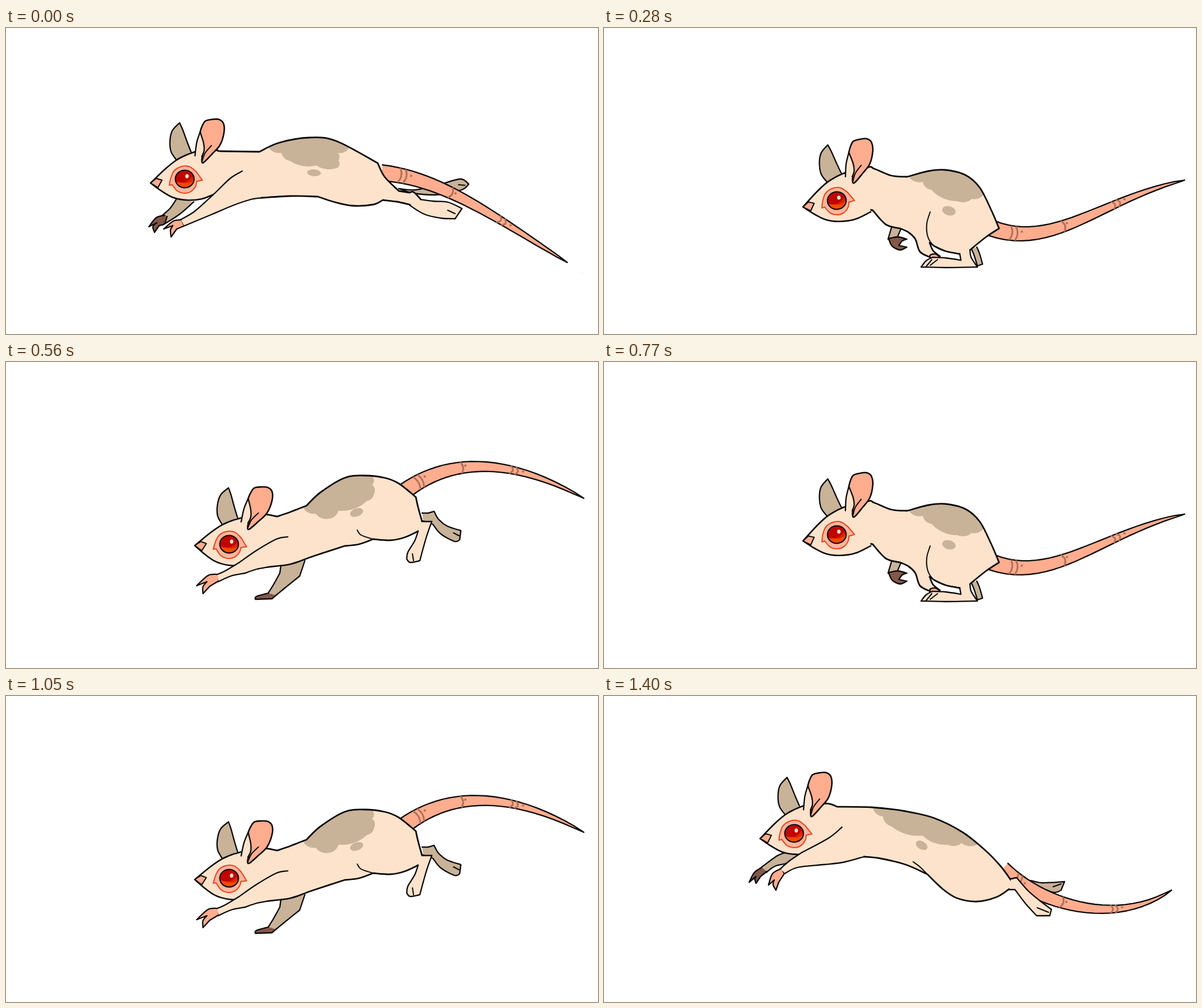
An HTML page for the animation above (1470 ms loop, 1040 px wide and 539 px high).

```html
<!DOCTYPE html>
<html lang="en">
<head>
<meta charset="utf-8">
<title>Running mouse</title>
<style>
  html, body { margin: 0; width: 100%; height: 100%; overflow: hidden; background: #fff; }
  svg { display: block; width: 100%; height: 100%; }
  path { stroke-linejoin: round; stroke-linecap: round; }
</style>
</head>
<body>
<svg id="stage" viewBox="0 0 1040 539"></svg>
<script>
const STEP = 70;
const INK = '#0a0808', SKIN = '#fde3cb', TAN = '#c8b298', PINK = '#ffad8e', DARK = '#835848', BAND = '#b0705a';

// Points are "x y x y"; a slash makes a corner at the point before it.
function pairs(text) {
  const n = text.trim().split(/\s+/).map(Number), out = [];
  for (let i = 0; i < n.length; i += 2) out.push([n[i], n[i + 1]]);
  return out;
}

function curve(text) {
  let d = '', last;
  for (const part of text.split('/')) {
    const p = pairs(part);
    if (last) p.unshift(last); else d = 'M' + p[0];
    for (let i = 0; i < p.length - 1; i++) {
      const b = p[i], c = p[i + 1], a = p[i - 1] || b, e = p[i + 2] || c;
      const h1 = b.map((v, k) => (v + (c[k] - a[k]) / 6).toFixed(1));
      const h2 = c.map((v, k) => (v - (e[k] - b[k]) / 6).toFixed(1));
      d += `C${h1} ${h2} ${c}`;
    }
    last = p[p.length - 1];
  }
  return d;
}

const path = (d, fill = 'none', stroke = 'none', width = 2.3, extra = '') =>
  `<path d="${d}" fill="${fill}" stroke="${stroke}" stroke-width="${width}" ${extra}/>`;
const shape = (text, fill, width) => path(curve(text), fill, INK, width);
const line = text => shape(text, 'none', 2);

// Tapered tube along one cubic, with bands and dots.
function tail(text) {
  const [a, b, c, e] = pairs(text);
  const at = (s, side) => {
    const u = 1 - s;
    const pos = k => u * u * u * a[k] + 3 * u * u * s * b[k] + 3 * u * s * s * c[k] + s * s * s * e[k];
    const vel = k => u * u * (b[k] - a[k]) + 2 * u * s * (c[k] - b[k]) + s * s * (e[k] - c[k]);
    const w = side * 14 * Math.pow(u, .66) / Math.hypot(vel(0), vel(1));
    return [pos(0) + vel(1) * w, pos(1) - vel(0) * w].map(v => v.toFixed(1));
  };
  const top = [], low = [];
  for (let i = 0; i <= 24; i++) {
    top.push(at(i / 24, 1));
    low.unshift(at(i / 24, -1));
  }
  const bands = [.1, .13, .4, .67, .695].map(s =>
    path(`M${at(s, .9)}Q${at(s + .022, 0)} ${at(s, -.9)}`, 'none', BAND, 3));
  const dots = [.165, .425, .73].map(s => {
    const [x, y] = at(s, .3);
    return `<circle cx="${x}" cy="${y}" r="2" fill="${BAND}"/>`;
  });
  return path('M' + top.concat(low).join('L'), PINK, INK, 2.3) + bands.join('') + dots.join('');
}

// Fur patch: scalloped lower edge, open upward and clipped by the body.
function patch(text) {
  const p = pairs(text), end = p[p.length - 1];
  let d = 'M' + p[0];
  for (let i = 1; i < p.length; i++) {
    const len = Math.hypot(p[i][0] - p[i - 1][0], p[i][1] - p[i - 1][1]);
    const r = (len * .6 + len * len / 80).toFixed(1);
    d += `A${r} ${r} 0 0 0 ${p[i]}`;
  }
  return path(d + `L${end[0]} ${end[1] - 70}L${p[0][0]} ${p[0][1] - 70}Z`, TAN);
}

const FACE = '18 -48 2 -42 -15 -33 -35 -17 -60 7 / -44 19 -22 32 2 37 30 35 58 24';
const farEar = shape('-15 -34 -24 -48 -26 -66 -22 -85 -9 -99 / -4 -88 4 -66 11 -48', TAN);
const head =
  path(curve(FACE) + 'L52 -46Z', SKIN) + shape(FACE, 'none', 2.6) +
  shape('-60 7 / -50 -1 / -40 2 / -47 15 / -60 7', PINK, 2) +
  shape('27 -83 30 -92 36 -102 48 -105 60 -105 68 -98 69 -82 62 -60 48 -44 33 -29 30 -34 33 -50 / 27 -83', PINK, 2.6) +
  shape('18 -41 21 -64 27 -83 / 33 -64 34 -50 30 -40', SKIN) +
  line('47 -59 36 -46 31 -33') +
  path(curve('-22 10 / -27 11 / -25 0 -19 -14 -6 -22 8 -22 20 -13 / 31 2 / 21 4 / 19 13 11 22 0 25 -13 21 -22 10'), '#fcb79e', '#f0401a', 2) +
  `<ellipse rx="16.5" ry="15.5" fill="#c00400"/>` +
  path('M-15.500 5Q2 9 16 1A16.500 15.500 0 0 1 -15.500 5Z', '#ee4a00') +
  path('M-9 6Q4 8 13 -4Q16 2 12 5Q2 9 -9 6Z', '#dc2400') +
  `<ellipse rx="16.5" ry="15.5" fill="none" stroke="${INK}" stroke-width="2"/>` +
  `<ellipse cx="4" cy="-5" rx="3" ry="3.600" fill="#ffe6cf"/>`;

const poses = [
  {
    head: [314, 266, 0],
    tail: '660 255 765 265 850 327 986 413',
    far: [
      ['299 302 288 318 272 332 / 277 346 / 305 328 330 306', TAN],
      ['279 330 264 334 251 350 / 265 343 / 258 350 261 360 / 269 348 / 278 345 283 332', DARK],
      ['690 283 716 291 750 294 775 292 / 803 284 813 275 / 799 266 768 274 / 720 285 690 283', TAN]
    ],
    farLines: ['795 276 806 277'],
    body: '325 235 / 368 216 378 217 445 218 / 480 202 533 193 580 199 653 238 / 665 262 690 287 / 709 290 / 716 289 728 301 / 735 318 / 709 311 / 687 306 662 303 / 645 311 608 313 575 306 548 297 / 500 296 450 299 / 325 290 / 325 235',
    patch: '461 210 484 220 499 234 545 242 583 246 584 233 583 220 602 212',
    spot: [541, 255, 12, 6, 3],
    near: [
      ['415 252 395 264 375 283 / 355 302 330 324 306 338 / 312 349 / 360 329 400 312 430 302 450 299', SKIN],
      ['307 338 294 340 277 354 / 293 348 / 289 356 290 368 / 300 354 / 312 349', PINK],
      ['728 302 750 305 777 307 801 318 / 789 336 / 765 335 735 328 709 312', SKIN]
    ],
    lines: ['776 321 789 327'],
    extra: path('M1011 431L1013 433', 'none', '#ddd', 1)
  },
  {
    head: [392, 321, 4.5],
    tail: '700 228 770 175 872 160 1015 240',
    far: [
      ['483 358 481 372 / 470 392 460 408 / 467 417 / 490 398 516 377 / 525 350', TAN],
      ['461 407 440 413 438 418 / 467 417 / 474 411', DARK],
      ['731 266 742 266 752 263 / 760 277 775 289 799 297 / 797 313 / 788 316 764 303 750 286 / 733 280', TAN]
    ],
    farLines: ['786 301 796 306'],
    body: '395 300 / 440 270 477 272 / 500 264 528 253 / 552 230 595 204 630 200 665 204 690 214 720 238 / 724 256 731 281 / 738 290 / 724 298 / 700 309 675 314 645 312 / 620 321 595 324 / 540 342 500 356 460 361 / 405 345 / 395 335 / 395 300',
    patch: '523 258 544 267 567 276 584 262 634 245 647 231 643 216 645 204',
    spot: [616, 265, 12, 7, -20],
    near: [
      ['495 308 475 312 440 332 410 353 / 385 368 369 375 / 373 387 / 395 377 420 372 / 440 365 461 361', SKIN],
      ['371 374 355 376 335 394 / 353 387 / 346 396 346 408 / 358 395 / 373 386', PINK],
      ['731 281 748 281 / 738 310 727 350 / 710 353 704 347 / 706 335 718 315 724 298', SKIN]
    ],
    lines: ['617 296 624 305 645 312', '714 338 716 350']
  },
  {
    head: [428, 332, 4],
    tail: '705 270 765 215 845 174 985 202',
    far: [
      ['545 375 560 382 585 393 600 402 / 602 408 616 407 / 612 398 597 378 582 354', TAN],
      ['600 403 598 408 583 414 584 420 / 606 420 / 617 408 / 613 404', DARK],
      ['703 352 670 362 650 376 642 390 / 650 394 / 660 388 690 362 705 358', TAN],
      ['707 322 714 332 725 350 / 718 355 708 343', TAN]
    ],
    farLines: ['654 390 662 378'],
    body: '430 300 / 485 284 507 285 / 540 255 590 228 628 223 665 231 700 254 713 266 / 707 300 706 340 / 708 350 / 700 352 / 680 355 650 355 622 344 / 613 342 595 345 / 580 352 / 530 370 / 502 357 / 486 357 / 430 300',
    patch: '541 262 553 272 566 281 580 283 597 283 641 278 648 266 650 252 661 236',
    spot: [621, 295, 13, 7, -8],
    near: [
      ['502 358 497 374 / 485 386 467 396 / 472 406 / 490 406 510 403 545 378 580 352', SKIN],
      ['474 394 455 396 436 400 / 451 404 / 442 408 438 415 / 455 410 475 405', PINK],
      ['706 325 707 342 722 358 / 702 375 690 394 / 672 400 654 404 / 658 390 672 381 692 372 / 698 364 702 352', SKIN]
    ],
    lines: ['600 305 604 322 622 344 655 355 700 351', '664 399 674 386', '673 398 679 384']
  },
  {
    head: [426, 318, 0],
    tail: '698 318 778 303 861 237 1002 235',
    far: [
      ['548 366 552 385 566 402 / 580 400 / 575 380 580 355', TAN],
      ['566 400 560 410 549 418 552 423 / 575 422 / 581 400', DARK],
      ['655 375 630 384 600 394 586 404 / 590 412 / 615 408 650 392', TAN]
    ],
    body: '420 290 / 480 268 515 274 / 550 247 605 234 650 244 688 276 706 312 / 702 330 698 345 / 680 370 / 662 372 / 630 373 605 366 590 350 / 575 355 / 530 362 / 502 342 / 484 341 / 420 290',
    patch: '533 268 555 274 568 287 590 290 640 287 655 272 657 258 668 255',
    spot: [616, 306, 13, 7, 3],
    near: [
      ['502 342 506 365 500 390 495 408 / 508 412 / 522 395 545 372 575 355', SKIN],
      ['496 406 484 412 472 419 474 424 / 502 424 / 509 410', PINK],
      ['700 338 696 352 683 370 / 668 386 655 402 / 630 414 608 418 / 604 414 / 612 402 635 392 / 652 384 662 370', SKIN]
    ],
    lines: ['589 312 583 335 596 358 630 373 662 372', '613 415 622 404']
  },
  {
    head: [409, 304, -4],
    tail: '682 353 790 392 877 300 1020 268',
    far: [
      ['506 348 499 372 / 512 373 522 353', TAN],
      ['500 371 506 384 520 391 532 386 / 518 383 / 524 375 532 372 / 516 368 500 371', DARK],
      ['655 386 660 398 665 416 / 656 419 / 650 400 645 388', TAN]
    ],
    body: '400 270 / 461 246 475 248 505 260 533 262 / 570 252 600 250 635 259 660 281 680 320 694 353 / 670 369 643 391 / 640 402 / 625 398 / 600 393 580 384 / 572 378 / 578 392 590 402 / 580 406 573 404 / 555 394 547 372 535 360 520 353 / 495 346 472 321 / 455 318 / 400 270',
    patch: '536 263 560 271 575 285 621 305 646 301 667 293',
    spot: [606, 322, 12, 8, 15],
    near: [
      ['573 404 573 400 582 398 590 403', PINK],
      ['625 398 / 627 409 / 600 405 577 404 / 566 410 557 421 / 600 422 656 421 / 645 404 643 391', SKIN]
    ],
    lines: ['573 324 567 345 569 368 580 384 600 393 625 398', '566 420 576 408', '573 418 586 408']
  },
  {
    head: [373, 266, -3],
    tail: '691 330 778 378 886 354 1008 305',
    far: [
      ['395 298 375 310 352 325 / 360 334 / 385 325 410 308', TAN],
      ['353 324 340 332 333 346 / 344 340 / 343 348 346 354 / 352 342 / 361 333', DARK],
      ['708 360 735 390 752 410 / 748 421 / 730 420 / 715 395', TAN]
    ],
    body: '380 240 / 425 214 450 219 500 223 / 550 221 600 232 645 258 675 294 704 338 / 702 350 / 695 380 / 668 372 / 625 366 590 350 568 328 / 530 314 490 308 462 308 / 400 292 / 380 285 / 380 240',
    patch: '503 224 525 237 540 250 590 270 628 281 648 275 668 284',
    spot: [582, 292, 12, 7, 22],
    near: [
      ['452 262 430 282 405 298 / 385 315 372 330 / 382 337 / 405 322 435 318 462 308', SKIN],
      ['373 329 362 340 358 356 / 366 348 / 366 358 372 365 / 375 350 / 382 337', PINK],
      ['702 350 712 372 728 395 / 735 412 / 726 422 / 690 424 662 423 / 668 412 690 407 / 705 405 / 690 385 668 372', SKIN]
    ],
    lines: ['556 303 560 318 568 328', '672 421 682 411']
  },
  {
    head: [334, 242, -2],
    tail: '700 305 765 365 896 409 997 342',
    far: [
      ['325 274 305 281 275 303 / 285 311 / 300 300 325 293 345 278', TAN],
      ['277 302 264 311 255 328 / 267 318 / 265 323 267 330 / 275 318 / 286 309', DARK],
      ['750 325 770 329 809 327 / 803 342 / 790 346 760 336', TAN]
    ],
    farLines: ['789 336 803 331'],
    body: '335 215 / 385 190 410 195 / 470 196 530 203 580 215 630 240 670 272 697 300 716 326 / 725 335 / 712 340 / 690 354 655 362 620 356 595 340 568 314 / 530 297 485 286 457 283 / 335 265 / 335 215',
    patch: '473 199 490 212 504 229 560 246 604 262 628 259 655 262',
    spot: [558, 263, 11, 7, 30],
    near: [
      ['418 231 395 250 347 276 / 325 291 309 305 / 317 313 / 340 302 385 297 420 293 457 283', SKIN],
      ['311 304 296 313 289 333 / 299 324 / 297 332 302 342 / 307 328 / 316 314', PINK],
      ['715 322 725 320 / 745 343 765 360 786 376 / 783 387 / 760 387 / 740 365 722 341 / 712 341', SKIN]
    ],
    lines: ['543 292 555 301 568 314', '761 373 781 381']
  }
];

function draw(p, i) {
  const [x, y, turn] = p.head;
  const place = `transform="translate(${x} ${y}) rotate(${turn})"`;
  const parts = list => list.map(a => shape(...a)).join('');
  const lines = (list = []) => list.map(line).join('');
  const body = curve(p.body);
  const [sx, sy, rx, ry, tilt] = p.spot;
  return `<g visibility="hidden"><clipPath id="body${i}"><path d="${body}"/></clipPath>` +
    parts(p.far) + lines(p.farLines) + `<g ${place}>${farEar}</g>` + tail(p.tail) +
    path(body, SKIN) + `<g clip-path="url(#body${i})">${patch(p.patch)}</g>` +
    `<ellipse rx="${rx}" ry="${ry}" transform="translate(${sx} ${sy}) rotate(${tilt})" fill="${TAN}"/>` +
    path(body, 'none', INK, 2.8) + `<g ${place}>${head}</g>` +
    parts(p.near) + lines(p.lines) + (p.extra || '') + '</g>';
}

const stage = document.getElementById('stage');
stage.innerHTML = poses.map(draw).join('');
const groups = [...stage.children];
const start = performance.now();

function tick() {
  const now = Math.floor((performance.now() - start) / STEP) % groups.length;
  groups.forEach((g, i) => g.setAttribute('visibility', i === now ? 'visible' : 'hidden'));
  requestAnimationFrame(tick);
}
tick();
</script>
</body>
</html>
```
